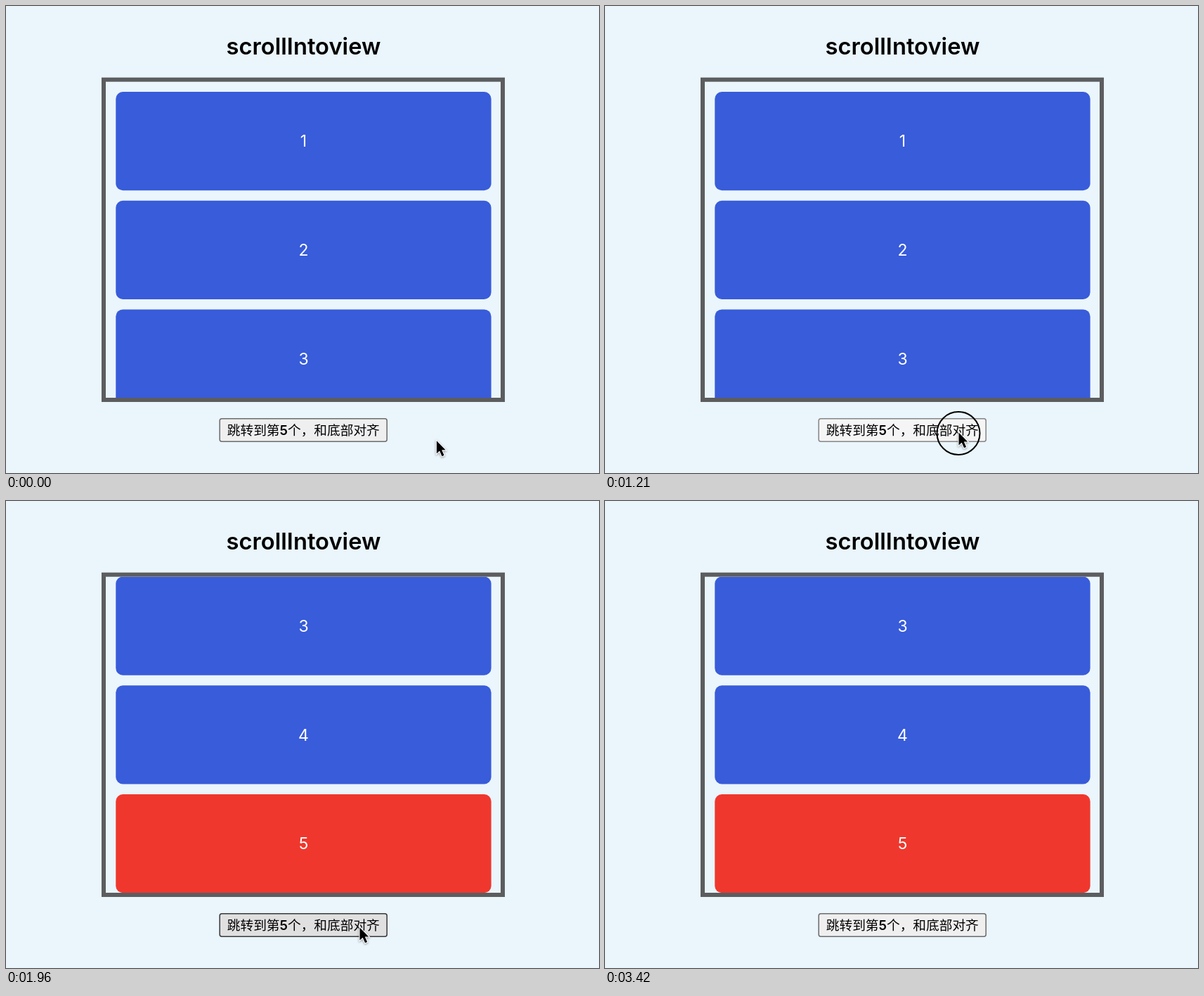
An HTML page that plays this animation: 844 px wide and 664 px high, repeating every 3460 ms.

```html
<!DOCTYPE html>
<html lang="zh-CN">
<head>
<meta charset="utf-8">
<style>
  html, body { margin: 0; width: 100%; height: 100%; overflow: hidden; background: #eaf5fc; }
  svg { display: block; width: 844px; height: 664px; }
  text { font-family: Inter, "Noto Sans CJK SC", "Noto Sans CJK", sans-serif; text-anchor: middle; }
</style>
</head>
<body>
<svg viewBox="0 0 844 664">
  <clipPath id="view"><rect x="142" y="108" width="563" height="450"/></clipPath>
  <text x="423.5" y="68.5" font-size="32.7" font-weight="600">scrollIntoview</text>
  <g clip-path="url(#view)"><g id="list" fill="#fff" font-size="23"></g></g>
  <rect x="139" y="104.7" width="568" height="455.3" fill="none" stroke="#5c5d5f" stroke-width="6"/>
  <rect id="bar" x="692.5" y="242.5" width="9" height="180" rx="4.5" fill="#6b6d70"/>
  <rect id="button" x="304.2" y="586.7" width="238" height="32.6" rx="3" stroke-width="1.5"/>
  <text x="423.3" y="610" font-size="18.7" font-weight="500">跳转到第<tspan font-weight="600">5</tspan>个，和底部对齐</text>
  <circle id="ring" cx="503" cy="607.5" r="30.5" fill="none" stroke="#000" stroke-width="2"/>
  <path id="cursor" d="M0 0V18L4.2 14.2 7.6 21.8 10.6 20.5 7.3 13H12.7Z" stroke="#fff" stroke-width="2.2"
    paint-order="stroke" style="filter: drop-shadow(0 1.5px 1.5px #0006)"/>
</svg>
<script>
const LOOP = 3460, PRESS = 1090, RELEASE = 1240;
const [list, bar, button, ring, cursor] =
  ['list', 'bar', 'button', 'ring', 'cursor'].map(id => document.getElementById(id));

for (let n = 1; n <= 5; n++) {
  const y = 122 + (n - 1) * 154.7;
  list.innerHTML += `<rect x="156.3" y="${y}" width="534.3" height="140.2" rx="10"
    fill="${n === 5 ? '#f0372d' : '#385cda'}"/><text x="423.5" y="${y + 78.3}">${n}</text>`;
}

const progress = (t, from, to) => Math.max(0, Math.min(1, (t - from) / (to - from)));
const easeOut = k => 1 - (1 - k) ** 2;
const easeInOut = k => k * k * (3 - 2 * k);
const curve = (k, a, b, c) =>
  a.map((v, i) => (1 - k) ** 2 * v + 2 * k * (1 - k) * b[i] + k * k * c[i]);

const entry = [613.3, 618.5], target = [503.5, 606.5], aside = [776, 478], rest = [770, 425];

function pointerAt(t) {
  if (t < 1960) return curve(easeOut(progress(t, 0, 740)), entry, [540, 590], target);
  if (t < 2290) return curve(easeInOut(progress(t, 1960, 2290)), target, [810, 625], aside);
  return curve(easeInOut(progress(t, 2290, 2500)), aside, [784, 450], rest);
}

function paint(t) {
  const [x, y] = pointerAt(t);
  const hover = x < 543 && y > 586 && y < 620;
  const pressed = t >= PRESS && t < RELEASE;
  const [fill, stroke] = pressed ? ['#f5f5f5', '#858585']
    : hover ? ['#e0e0e0', '#383838'] : ['#efefef', '#6b6b6b'];
  button.setAttribute('fill', fill);
  button.setAttribute('stroke', stroke);
  ring.setAttribute('opacity', pressed ? 1 : 0);
  list.setAttribute('transform', `translate(0 ${t < RELEASE ? 0 : -323.8})`);
  bar.setAttribute('opacity', t < RELEASE ? 0 : 1 - progress(t, 1750, 1950));
  cursor.setAttribute('transform', `translate(${x} ${y})`);
  cursor.setAttribute('opacity', 1 - progress(t, 2600, 2720));
}

const start = performance.now();
function tick() {
  paint((performance.now() - start) % LOOP);
  requestAnimationFrame(tick);
}
tick();
</script>
</body>
</html>
```
